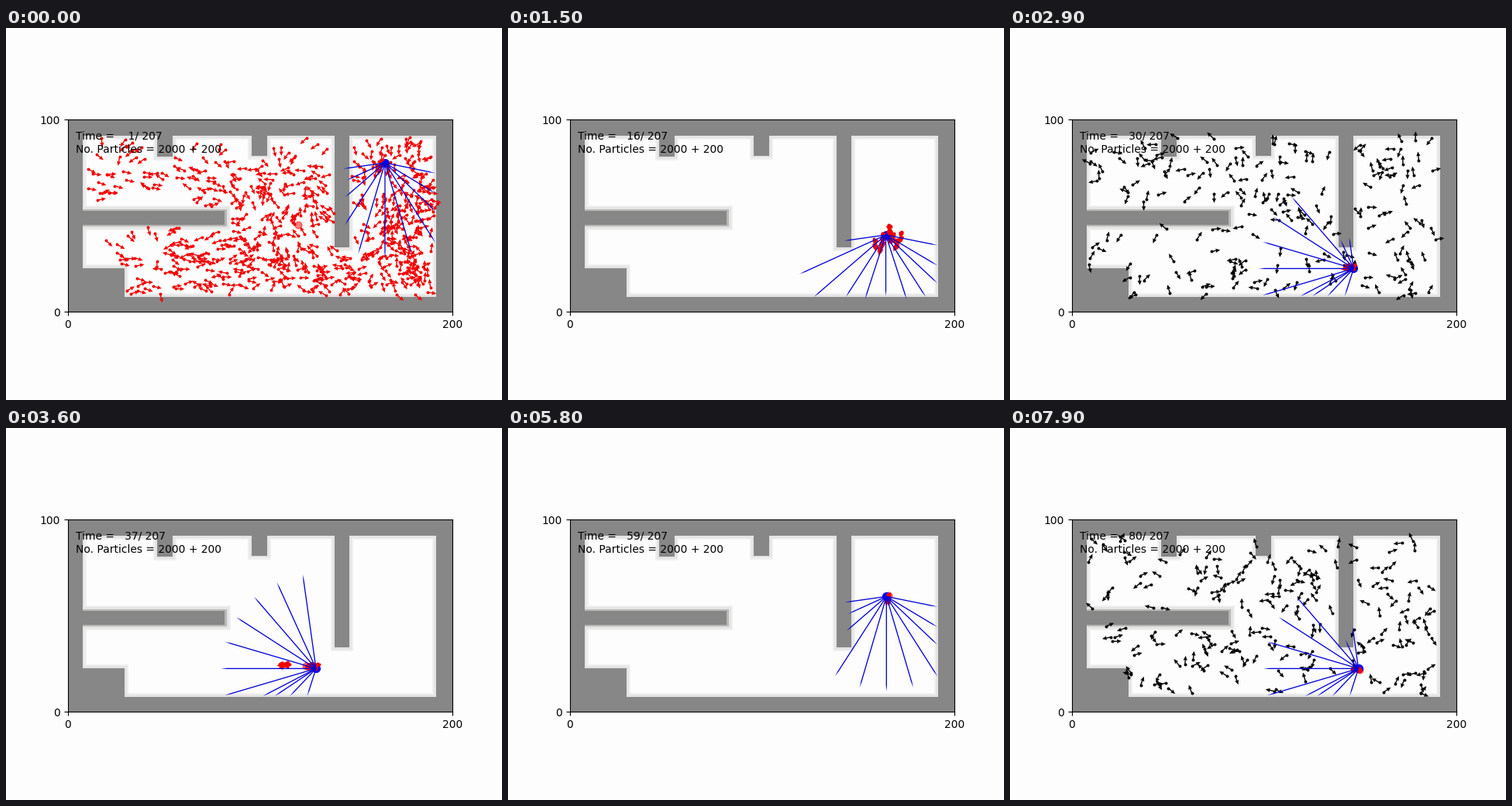
A matplotlib script for the animation above (8000 ms loop, 640x480 px).

```python
import numpy as np
import matplotlib.pyplot as plt
from matplotlib.animation import FuncAnimation
from matplotlib.patches import Rectangle

FRAMES, KIDNAP, TURN = 80, 51, 22
STEP = 6.2                          # pixels travelled per frame
BEAM = 13.6                         # pixels between samples along a beam
FAN = np.linspace(-82, 82, 11)      # beam angles around the heading
L, R, T, B = 80, 576, 118.4, 366.4
PAPER, WALL = "#fdfdfd", "#878787"

BAR = (L, 285, 233.5, 256)
SOLID_WALLS = [(195, 215, T, 166), (317, 337, T, 164.5), (424, 443, T, 283), BAR,
               (L, 98.6, T, B), (L, R, T, 139.3), (L, 153, 310, B)]
WALLS = SOLID_WALLS + [(555, R, T, B), (L, R, 347, B)]


def raster(walls):
    yy, xx = np.mgrid[:480, :640]
    return np.any([(xx > x0) & (xx < x1) & (yy > y0) & (yy < y1)
                   for x0, x1, y0, y1 in walls], axis=0)


def lookup(grid, x, y):
    return grid[np.clip(y, 0, 479).astype(int), np.clip(x, 0, 639).astype(int)]


SOLID, BLOCKED = raster(SOLID_WALLS), raster(WALLS)


def scan(pose):
    """Beam lengths in samples and unit directions for poses (x, y, heading)."""
    x, y = pose[:, :1], pose[:, 1:2]
    ang = np.radians(pose[:, 2:] + FAN)
    dx, dy = np.cos(ang), -np.sin(ang)
    reach = np.full(ang.shape, 9)
    for k in range(9, 0, -1):
        px, py = x + k * BEAM * dx, y + k * BEAM * dy
        hit = lookup(SOLID, px, py) | ((k >= 6) & (py > 347)) | ((k >= 7) & (px > 555))
        reach[hit] = k
    return reach, dx, dy


def robot(f):
    """Down the right-hand room, then left; carried back to the start once."""
    g = f % KIDNAP
    down, left = min(g, TURN), max(g - TURN, 0)
    return np.array([489 - .1 * down - STEP * left, 174 + STEP * down,
                     180 if left else 270])


def scatter(rng, n):
    pose = rng.uniform((101, 141, 0), (553, 345, 360), (3 * n, 3))
    return pose[~lookup(BLOCKED, pose[:, 0], pose[:, 1])][:n]


def simulate(seed=4):
    """Particle filter: per frame the red swarm and the injected black one."""
    rng = np.random.default_rng(seed)
    near = robot(0) + rng.normal(0, (12, 12, 8), (12, 3))
    pose = np.vstack([scatter(rng, 2000), near])
    history = []
    for f in range(FRAMES):
        if f:
            if f % KIDNAP == TURN + 1:
                pose[:, 2] -= 90
            r = np.radians(pose[:, 2])
            pose[:, 0] += STEP * np.cos(r)
            pose[:, 1] -= STEP * np.sin(r)

        # Jittered copies of each hypothesis; the first stays exact
        n = len(pose)
        copies = int(np.clip(200 // n, 1, 10))
        spread = rng.uniform(.3, 2, (n, 1, 1)) * np.array([1, 1, 4])
        kids = pose[:, None] + spread * rng.normal(0, 1, (n, copies, 3))
        kids[:, 0] = pose

        flat = kids.reshape(-1, 3)
        error = BEAM * np.abs(scan(flat)[0] - scan(robot(f)[None])[0]).mean(axis=1)
        error += 40 * lookup(BLOCKED, flat[:, 0], flat[:, 1])
        error = error.reshape(n, copies)
        best = error.min(axis=1)
        pose = kids[np.arange(n), error.argmin(axis=1)]

        # Selection tightens as time passes since the last injection
        age = f % 10 + 1
        cap = int(10 + 540 * .72 ** f + 60 * .6 ** age)
        limit = (1.2 + 10 * .6 ** age + 6 * .9 ** f) * (best.min() + 2)
        keep = np.argsort(best)[:cap]
        keep = keep[best[keep] <= limit]
        pose = pose[keep]

        fresh = scatter(rng, 200 if f % 10 == 9 else 0)
        history.append((kids[keep].reshape(-1, 3), fresh))
        pose = np.vstack([pose, fresh])
    return history


history = simulate()

fig = plt.figure(figsize=(6.4, 4.8), dpi=100, facecolor=PAPER)
ax = fig.add_subplot(facecolor=PAPER)
ax.set(xlim=(L, R), ylim=(B, T), aspect="equal")
ax.set_xticks([L, R], ["0", "200"])
ax.set_yticks([B, T], ["0", "100"])


def block(x0, x1, y0, y1, color, grow=0):
    ax.add_patch(Rectangle((x0 - grow, y0 - grow), x1 - x0 + 2 * grow,
                           y1 - y0 + 2 * grow, color=color, lw=0, zorder=.5))


for grow, color in ((5, "#f0f0f0"), (2.8, "#e4e4e4"), (0, WALL)):
    for wall in WALLS:
        block(*wall, color, grow)
block(98.6, 285, 233.5, 256, "#b8b8b4")
block(98.6, 282, 236, 253.5, WALL)

clock = ax.text(90, 143.3, "", fontsize=10, zorder=9)
ax.text(90, 160.7, "No. Particles = 2000 + 200", fontsize=10, zorder=9)
guess, = ax.plot([], [], "o", ms=6.4, color="red", alpha=.5, zorder=2)
body, = ax.plot([], [], "o", ms=7, color="blue", zorder=3)
drawn = []


def quiver(x, y, u, v, **style):
    drawn.append(ax.quiver(x, y, u, v, units="dots", scale_units="dots", scale=1, **style))


def arrows(pose, color, z):
    if not len(pose):
        return
    x, y, deg = pose.T
    r = np.radians(deg)
    quiver(x, y, 11.5 * np.cos(r), 11.5 * np.sin(r), color=color, width=1.4,
           headwidth=3.8, headlength=4.2, headaxislength=3.8, zorder=z)
    drawn.append(ax.scatter(x, y, s=8, color=color, lw=0, zorder=z))


def beams(pose):
    x, y = pose[:2]
    reach, dx, dy = (v[0] for v in scan(pose[None]))
    ex = np.minimum(x + BEAM * reach * dx, 554)
    ey = np.minimum(y + BEAM * reach * dy, np.where(reach <= 6, 346, 350))
    quiver(np.full(len(FAN), x), np.full(len(FAN), y), ex - x, y - ey, color="#0000d8",
           width=1.3, headwidth=1, headlength=6, headaxislength=6, zorder=6)


def update(f):
    while drawn:
        drawn.pop().remove()
    red, black = history[f]
    pose = robot(f)
    clock.set_text(f"Time = {f + 1:4d}/ 207")
    body.set_data(pose[:1], pose[1:2])
    guess.set_data([red[:, 0].mean()], [red[:, 1].mean()])
    arrows(black, "black", 4)
    arrows(red, "#f00000", 5)
    beams(pose)
    return [clock, body, guess, *drawn]


anim = FuncAnimation(fig, update, frames=FRAMES, interval=100, repeat=True,
                     repeat_delay=0, blit=False)
plt.show()
```
